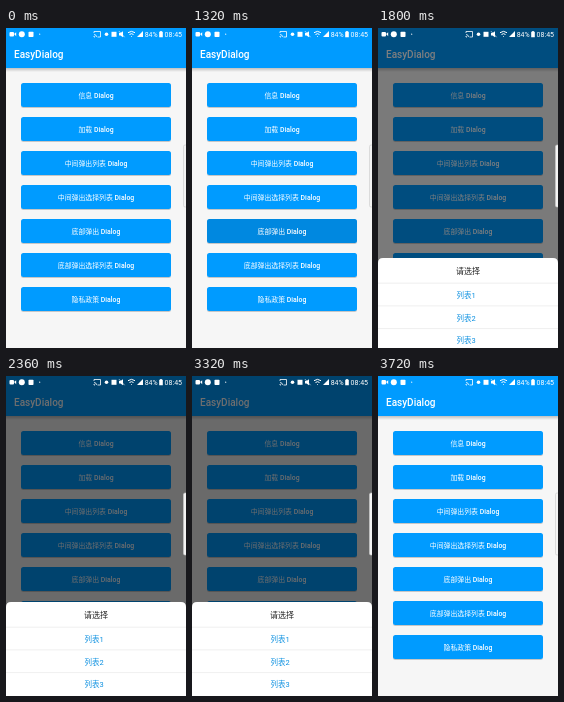
An HTML page that plays this animation: 180x320 px, repeating every 3.8 s.

```html
<!DOCTYPE html>
<html lang="zh-CN">
<head>
<meta charset="utf-8">
<style>
html, body { margin: 0; width: 100%; height: 100%; overflow: hidden; background: #f6f6f6; }
svg { display: block; width: 180px; height: 320px; font-family: Roboto, "Noto Sans CJK SC", "Noto Sans CJK", sans-serif; }
.label { font-size: 6.9px; font-weight: 500; fill: #fff; text-anchor: middle; }
.item { font-size: 7.5px; fill: #0a8fe0; text-anchor: middle; }
</style>
</head>
<body>
<svg viewBox="0 0 180 320">
  <defs>
    <linearGradient id="shade" x2="0" y2="1">
      <stop stop-opacity=".22"/><stop offset="1" stop-opacity="0"/>
    </linearGradient>
    <filter id="lift" x="-5%" y="-20%" width="110%" height="150%">
      <feDropShadow dx="0" dy=".7" stdDeviation=".7" flood-opacity=".28"/>
    </filter>
  </defs>
  <rect width="180" height="320" fill="#f6f6f6"/>
  <rect y="40" width="180" height="4" fill="url(#shade)"/>
  <rect width="180" height="40" fill="#009bff"/>
  <text x="8" y="30" font-size="10" font-weight="500" fill="#fff">EasyDialog</text>
  <g id="buttons"></g>
  <rect id="dim" width="180" height="320"/>
  <g id="sheet">
    <path d="M0 94V5Q0 0 5 0H175Q180 0 180 5V94Z" fill="#fff"/>
    <text x="90" y="16" font-size="8" font-weight="500" text-anchor="middle" fill="#222">请选择</text>
    <g id="items"></g>
  </g>
  <rect x="177.5" y="117" width="6" height="62" rx="1.5" fill="#f4f4f4" stroke="#c9c9c9" stroke-width=".6"/>
  <g id="status" fill="#fff">
    <rect x="3.5" y="4" width="4.5" height="4.5" rx="1"/>
    <path d="M8 6l2.2-1.7v4z"/>
    <circle cx="15.8" cy="6.2" r="3"/>
    <rect x="22.5" y="3.8" width="5" height="5.2" rx=".8"/>
    <circle cx="33.7" cy="6.2" r=".6"/>
    <path d="M88 5V3.5h6.5v5.5h-3M88 6.5q2.5 0 2.5 2.5M88 8v1h1" fill="none" stroke="#fff" stroke-width=".8"/>
    <circle cx="100.5" cy="6.3" r="1.8"/>
    <rect x="105.5" y="3.8" width="5" height="5"/>
    <path d="M113 5h1.5l2.5-1.8v6l-2.5-1.8H113z"/>
    <path d="M113 3.2l5.5 6" stroke="#fff" stroke-width=".7"/>
    <path d="M122 4.7q3.5-2.7 7 0M123.5 6.5q2-1.6 4 0M125.5 8.3v.7" fill="none" stroke="#fff"/>
    <path d="M131 9h6V3z"/>
    <text x="138.7" y="9" font-size="7">84%</text>
    <path d="M153.2 3.8h1v-.8h1.6v.8h1V9.3h-3.6z"/>
    <text x="176" y="9" font-size="7" text-anchor="end">08:45</text>
  </g>
</svg>
<script>
const LOOP = 3800, DIM = 0.57;
const byId = id => document.getElementById(id);
const ramp = (t, from, to) => Math.min(1, Math.max(0, (t - from) / (to - from)));

const names = ['信息', '加载', '中间弹出列表', '中间弹出选择列表', '底部弹出', '底部弹出选择列表', '隐私政策'];
byId('buttons').innerHTML = names.map((name, i) => `
  <g transform="translate(15 ${55 + 34 * i})">
    <rect width="150" height="24" rx="2.5" fill="#009bff" filter="url(#lift)"/>
    <rect class="press" width="150" height="24" rx="2.5" opacity="0"/>
    <text class="label" x="75" y="14.6">${name} Dialog</text>
  </g>`).join('');
byId('items').innerHTML = [1, 2, 3].map(n => `
  <path d="M0 ${2.5 + 22.7 * n}H180" stroke="#e4e4e4" stroke-width=".6"/>
  <text class="item" x="88" y="${17.2 + 22.7 * n}">列表${n}</text>`).join('');

const press = document.querySelectorAll('.press')[4];

function draw(now) {
  const t = now % LOOP;
  const enter = ramp(t, 1658, 1838), leave = ramp(t, 3370, 3560);
  const offset = 94 * ((1 - enter) ** 2 + leave ** 2);
  press.setAttribute('opacity', 0.12 * (ramp(t, 720, 800) - ramp(t, 1540, 1660)));
  byId('dim').setAttribute('opacity', DIM * (ramp(t, 1658, 1820) - ramp(t, 3370, 3660)));
  byId('sheet').setAttribute('transform', `translate(0 ${226 + offset})`);
  byId('sheet').setAttribute('opacity', 0.4 + 0.6 * ramp(t, 1660, 1760));
  requestAnimationFrame(draw);
}
requestAnimationFrame(draw);
</script>
</body>
</html>
```
